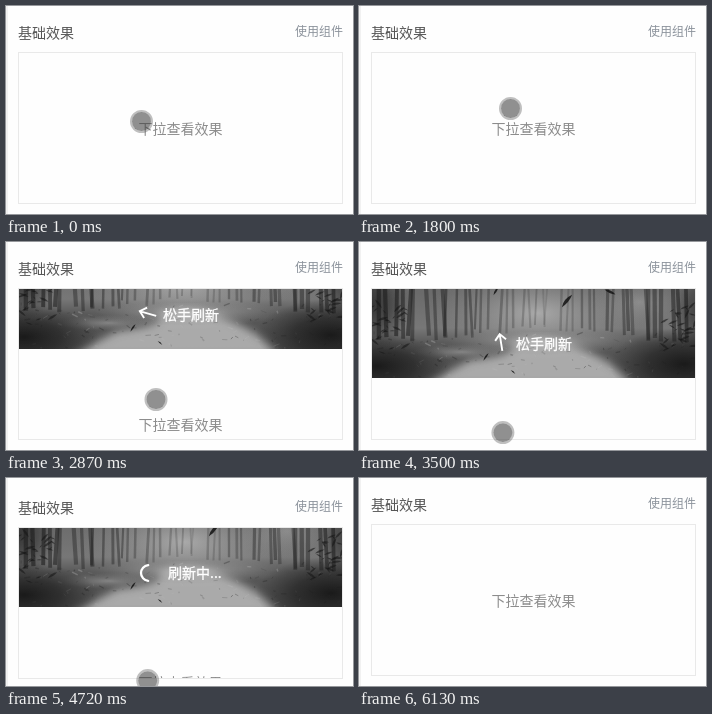
Write an HTML page that moves like this. It is 347 by 208 pixels and loops after 6780 ms.

```html
<!DOCTYPE html>
<html lang="zh">
<head>
<meta charset="utf-8">
<style>
html, body { margin: 0; width: 100%; height: 100%; overflow: hidden; background: #fefefe; }
svg { display: block; width: 347px; height: 208px; }
text { font: 14px "Noto Sans CJK SC", "Noto Sans CJK", sans-serif; }
</style>
</head>
<body>
<svg viewBox="0 0 347 208">
  <defs>
    <clipPath id="view"><rect x="13" y="47" width="323" height="150"/></clipPath>
    <clipPath id="photo"><rect y="-150" width="323" height="150"/></clipPath>
    <linearGradient id="sky" x1="0" y1="0" x2="0" y2="1">
      <stop offset="0" stop-color="#666"/>
      <stop offset=".5" stop-color="#777"/>
      <stop offset=".65" stop-color="#595959"/>
      <stop offset="1" stop-color="#4c4c4c"/>
    </linearGradient>
    <radialGradient id="glow">
      <stop offset="0" stop-color="#c4c4c4" stop-opacity=".85"/>
      <stop offset="1" stop-color="#909090" stop-opacity="0"/>
    </radialGradient>
    <radialGradient id="shade">
      <stop offset="0" stop-color="#141414" stop-opacity=".9"/>
      <stop offset=".5" stop-color="#1a1a1a" stop-opacity=".6"/>
      <stop offset="1" stop-color="#222" stop-opacity="0"/>
    </radialGradient>
    <filter id="soft"><feGaussianBlur stdDeviation=".6"/></filter>
    <filter id="mist"><feGaussianBlur stdDeviation="4"/></filter>
  </defs>
  <rect width="347" height="208" fill="#fefefe"/>
  <rect width="2" height="208" fill="#f1f1f1"/>
  <g id="page">
    <text x="12" y="31.6" fill="#565656">基础效果</text>
    <text x="337" y="30.3" fill="#8b929b" text-anchor="end" style="font-size:12px">使用组件</text>
    <rect x="12.5" y="46.5" width="324" height="151" fill="#fefefe" stroke="#e9e9e9"/>
    <g clip-path="url(#view)">
      <text id="hint" x="174.5" y="128" fill="#8c8c8c" text-anchor="middle">下拉查看效果</text>
      <g id="panel">
        <g id="forest" clip-path="url(#photo)"></g>
        <path id="arrow" d="M0 8.5V-8M-5.5-2.5L0-8.5L5.5-2.5" fill="none" stroke="#fff" stroke-width="1.9"/>
        <path id="spinner" fill="none" stroke="#fff" stroke-width="2.3" stroke-linecap="round"/>
        <text id="status" y="-29" fill="#fff" stroke="#fff" stroke-width=".3"></text>
      </g>
    </g>
  </g>
  <g id="pointer">
    <circle r="10.4" fill="none" stroke="#505050" stroke-opacity=".36" stroke-width="2.2"/>
    <circle r="9.4" fill="#404040" fill-opacity=".58"/>
  </g>
</svg>
<script>
const $ = id => document.getElementById(id);
const LOOP = 6780, TICK = 130;
const PRESS = 1800, RELEASE = 4720, CLOSE = 5640;

// Key points: [time, value, ...]
const pullKeys = [
  [PRESS, 0], [1940, 51], [2210, 45], [2600, 48], [2870, 60], [3500, 89], [4040, 99.5],
  [RELEASE - TICK, 99.5], [RELEASE, 79], [5080, 70], [CLOSE, 70], [5880, 0]
];
const hoverKeys = [
  [520, 135.5, 115.5], [640, 140.5, 106.5], [1040, 145.5, 95.5],
  [1190, 151.5, 87.5], [1440, 151.5, 87.5], [PRESS, 151.5, 102.5]
];
const joltKeys = [[RELEASE - TICK, 0], [RELEASE, 3], [5080, 0]];

// Moves between key points in even, visible steps of about one tick
function track(keys, t) {
  const i = keys.findIndex(k => k[0] > t);
  if (i <= 0) return keys.at(i).slice(1);
  const [a, b] = [keys[i - 1], keys[i]];
  const span = b[0] - a[0], steps = Math.round(span / TICK);
  const p = Math.floor((t - a[0]) / span * steps) / steps;
  return a.slice(1).map((v, j) => v + (b[j + 1] - v) * p);
}

const move = (el, x, y, turn = 0) =>
  el.setAttribute('transform', `translate(${x} ${y}) rotate(${turn})`);
const show = (el, on) => el.setAttribute('visibility', on ? 'inherit' : 'hidden');

function drawForest() {
  let seed = 11;
  const rnd = (a, b) => {
    seed = (seed * 16807) % 2147483647;
    return a + (b - a) * seed / 2147483647;
  };
  const blob = (fill, x, y, rx, ry, o = 1) =>
    `<ellipse cx="${x}" cy="${y}" rx="${rx}" ry="${ry}" fill="url(#${fill})" opacity="${o}"/>`;
  const leaf = (x, y, size, turn, o = .9) =>
    `<path d="M${-size} 0Q0 ${-size * .5} ${size} 0Q0 ${size * .35} ${-size} 0" fill="#181818"
      opacity="${o}" transform="translate(${x} ${y}) rotate(${turn})"/>`;

  let s = '<rect y="-100" width="323" height="100" fill="url(#sky)"/>';
  s += blob('glow', 165, -65, 110, 48, .8) + blob('glow', 268, -76, 50, 30, .4);
  s += '<g filter="url(#soft)">';
  // Trunks grow darker, thicker and longer away from the clearing
  for (let i = 0; i < 44; i++) {
    const x = i * 7.5 + rnd(-4, 4), far = Math.min(1, Math.abs(x - 168) / 150);
    s += `<path d="M${x} -100L${x + rnd(-4, 4)} ${rnd(-54, -46) + far * 12}" stroke="#222"
      stroke-width="${rnd(.8, 2) + far * 3}" opacity="${rnd(.08, .25) + far * .45}"/>`;
  }
  s += `<path d="M50 8L262 8Q246 -14 208 -30Q176 -48 140 -36Q150 -24 98 -18Z"
    fill="#b4b4b4" opacity=".9" filter="url(#mist)"/>`;
  s += blob('glow', 170, -36, 100, 13, .7) + blob('glow', 90, -26, 50, 8, .5);
  for (let i = 0; i < 130; i++) {
    const x = rnd(0, 323), y = rnd(-44, 2);
    s += `<path d="M${x} ${y}l${rnd(-6, 6)} ${rnd(-3, 0)}" stroke="${i % 3 ? '#222' : '#bbb'}"
      stroke-width="${rnd(.5, 1.6)}" opacity="${rnd(.12, .38)}"/>`;
  }
  s += blob('shade', 5, -12, 75, 32) + blob('shade', 312, -14, 75, 36);
  s += blob('shade', 0, -72, 38, 45, .7) + blob('shade', 328, -66, 28, 40, .6);
  s += '</g>';
  for (let i = 0; i < 60; i++) {
    const edge = rnd(0, 34);
    s += leaf(i % 2 ? edge : 323 - edge, rnd(-78, -25), rnd(2, 6), rnd(-70, 60), .6);
  }
  s += leaf(195, -77, 8, -50) + leaf(124, -87, 5, -60) + leaf(114, -21, 4.5, -55);
  s += leaf(141, -6, 3, 40) + leaf(238, -86, 6, 25);
  $('forest').innerHTML = s;
}

function arc(r, half) {
  const a = half * Math.PI / 180, x = r * Math.cos(a), y = r * Math.sin(a);
  return `M${x} ${-y}A${r} ${r} 0 0 1 ${x} ${y}`;
}

function render(t) {
  const [pull] = track(pullKeys, t);
  const busy = t >= RELEASE;
  move($('page'), 0, ...track(joltKeys, t));
  move($('hint'), 0, pull);
  move($('panel'), 13, 47 + pull);

  show($('arrow'), !busy);
  show($('spinner'), busy);
  move($('arrow'), 129, -35.5, Math.min(0, (pull - 93) * 2.25));
  const spin = Math.floor((t - RELEASE) / TICK) * TICK / (CLOSE - RELEASE);
  move($('spinner'), 130, -34, 180 + spin * 285);
  $('spinner').setAttribute('d', arc(8, 68 + 16 * Math.cos(Math.PI * spin)));
  $('status').textContent = busy ? '刷新中...' : '松手刷新';
  $('status').setAttribute('x', busy ? 149 : 144);

  // While pressed, the pointer and the panel move together
  const [grip] = track(pullKeys, Math.min(t, RELEASE - 1));
  const [x, y] = t < 1940 ? track(hoverKeys, t)
    : [150 - (grip - 60) * .21, 157.5 + (grip - 60) * 1.14];
  move($('pointer'), x, y);
  show($('pointer'), t < 790 || t >= 1040 && t < 6130);
}

drawForest();
const start = performance.now();
function frame() {
  render((performance.now() - start) % LOOP);
  requestAnimationFrame(frame);
}
frame();
</script>
</body>
</html>
```
